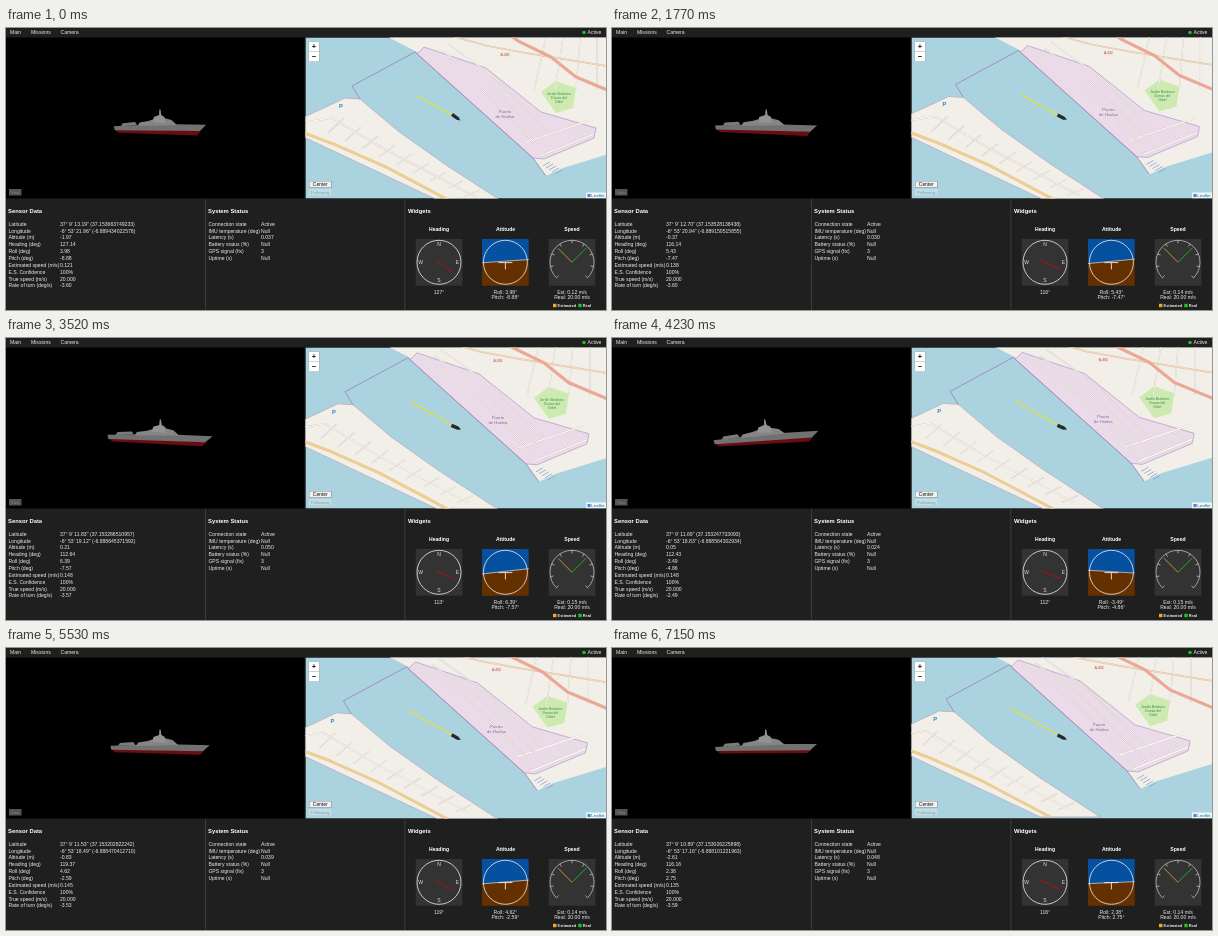
An HTML page with a canvas that plays this animation: 600x282 px, repeating every 7.19 s.

```html
<!DOCTYPE html>
<html lang="en">
<head>
<meta charset="utf-8">
<title>Vessel monitor</title>
<style>
html, body { margin: 0; width: 100%; height: 100%; overflow: hidden; background: #1f1f1f; }
canvas { display: block; width: 600px; height: 282px; }
</style>
</head>
<body>
<canvas id="stage"></canvas>
<script>
const LOOP = 7190, END = 7150, STEP = 47.9;
const { PI, sin, cos, abs, floor, round } = Math;
const canvas = document.getElementById('stage');
const dpr = window.devicePixelRatio || 1;
canvas.width = 600 * dpr;
canvas.height = 282 * dpr;
const c = canvas.getContext('2d');

// Attitude key points; swell adds the rocking between them
const times = [0, 950, 1770, 2850, 4230, 5530, END];
const keys = {
  heading: [127.14, 118.65, 116.14, 112.84, 112.43, 119.37, 116.16],
  roll: [3.98, -7.45, 5.43, -7.28, -3.49, 4.62, 2.38],
  pitch: [-8.88, 5.34, -7.47, 6.40, -4.86, -2.59, 2.75]
};
const swell = {
  heading: () => 0,
  roll: t => 7 * cos(2 * PI * (t + 150) / 1850),
  pitch: t => -6 * cos(2 * PI * t / 1850)
};

function sample(time) {
  let k = times.length - 1;
  while (times[k] > time) k--;
  const n = Math.min(k + 1, times.length - 1);
  const span = times[n] - times[k];
  const steps = round(span / STEP);
  const u = span ? floor((time - times[k]) / span * steps) / steps : 0;
  const t = times[k] + u * span;
  const s = {};
  for (const name in keys) {
    const wave = swell[name];
    const a = keys[name][k] - wave(times[k]);
    const b = keys[name][n] - wave(times[n]);
    s[name] = a + (b - a) * u + wave(t);
  }
  const arch = sin(PI * t / END);
  s.way = t / END + 0.1 * arch * sin(2 * PI * (t - 2200) / 5200);
  s.lat = 37.153663749233 - 0.000637523335 * s.way;
  s.lon = -6.889434022578 + 0.001332800615 * s.way;
  s.alt = -1.97 - 0.64 * t / END + 2.5 * arch;
  s.speed = 0.121 + 0.014 * t / END + 0.02 * arch;
  s.rate = -2.9 - 0.7 * cos(2 * PI * t / 1800);
  s.latency = 0.037 - 0.02 * sin(t / 600) + 0.006 * sin(t * 1.7);
  return s;
}

function text(str, x, y, size = 5.1, color = '#eee', align = 'left', weight = 'normal') {
  c.font = `${weight} ${size}px "Liberation Sans", Arial, sans-serif`;
  c.textAlign = align;
  c.fillStyle = color;
  c.fillText(str, x, y);
}

function trace(p) {
  c.beginPath();
  for (let i = 0; i < p.length; i += 2) c.lineTo(p[i], p[i + 1]);
}

function line(p, color, width = 1) {
  trace(p);
  c.strokeStyle = color;
  c.lineWidth = width;
  c.stroke();
}

function poly(p, fill, stroke) {
  trace(p);
  c.closePath();
  c.fillStyle = fill;
  c.fill();
  if (stroke) { c.strokeStyle = stroke; c.lineWidth = 0.8; c.stroke(); }
}

function rect(x, y, w, h, color) {
  c.fillStyle = color;
  c.fillRect(x, y, w, h);
}

function ring(x, y, r, color, a = 0, b = 2 * PI) {
  c.beginPath();
  c.arc(x, y, r, a, b);
  c.strokeStyle = color;
  c.lineWidth = 0.8;
  c.stroke();
}

function placed(x, y, degrees, draw) {
  c.save();
  c.translate(x, y);
  c.rotate(degrees * PI / 180);
  draw();
  c.restore();
}

function within(x, y, w, h, draw) {
  c.save();
  c.beginPath();
  c.rect(x, y, w, h);
  c.clip();
  draw();
  c.restore();
}

function drawCamera(s) {
  rect(0, 9.5, 298.5, 161, '#000');
  placed(154, 98, s.roll * 0.6 - 2.6, () => {
    c.scale(1 - (s.heading - 114) * 0.0085, 1);
    const keel = 8.3 - s.pitch * 0.15;
    poly([-51, 3, 46, 5, 42, keel, -47, 6.5], '#690d12');
    poly([-52, 0, 0, -2, 52, -1, 45, 5.2, -51, 4], '#717171');
    poly([-44, 0, -42, -3, -28, -4, -26, -1], '#7c7c7c');
    poly([-25, 0, -23, -3.5, -13, -5, 0, -9, 13, -6, 19, -1], '#858585');
    poly([-8, -4, -7, -9, -1, -11, -0.6, -16.5, 0.6, -16.5, 1.5, -11, 5, -9, 6, -3], '#929292');
  });
  rect(3, 161, 12.5, 6.5, '#555');
  text('View', 9.2, 165.7, 3.6, '#888', 'center');
}

function road(p, color, width) {
  line(p, '#c9bdb2', width + 0.5);
  line(p, color, width);
}

function drawSouth() {
  poly([285, 95, 320, 79, 339, 70, 354, 71, 392, 103, 440, 137, 500, 176, 440, 176, 285, 103],
    '#f2efe9', '#b9aebb');
  for (let i = 0; i < 9; i++) {
    const x = 322 + i * 17, y = 105 + i * 8;
    road([x, y, x + 16, y - 15 + i], '#fff', 0.7);
  }
  road([300, 94, 326, 90, 380, 122, 470, 169], '#fff', 1);
  road([285, 100, 330, 117, 380, 139, 450, 176], '#f7cf83', 2.2);
}

function drawNorth() {
  poly([370, -10, 384, 10, 411, 24, 527, 130, 540, 148, 557, 140, 625, 119, 625, -10], '#f2efe9');
  poly([535, 64, 550, 53, 570, 60, 567, 80, 550, 85], '#cdebb0');
  poly([411, 26, 418, 19, 480, 40, 535, 84, 590, 100, 588, 110, 538, 131, 527, 130], '#ebdbe8', '#b7a0cc');
  for (let i = 0; i < 5; i++) {
    const x = 537 + i * 3, y = 138 + i * 2;
    line([x, y, x + 7, y - 4], '#8f9fd2', 0.8);
    road([527 + i * 11, 119 - i * 5, 535 + i * 11, 126 - i * 5], '#fff', 1);
  }
  road([520, 114, 585, 92], '#fff', 1.2);
  road([534, 128, 588, 106], '#fff', 1.2);
  for (let i = 0; i < 3; i++) {
    const x = 428 + i * 7, y = 28 - i * 6;
    road([x, y, x + 45, y + 32, x + 102, y + 88], '#fff', 0.9);
  }
  for (let i = 0; i < 4; i++) road([540 + i * 17, 10, 528 + i * 21, 62], '#fff', 0.8);
  road([418, -8, 449, 9, 482, 18, 520, 25, 625, 42], '#f9d9b5', 1.2);
  road([485, -8, 512, 13, 545, 29, 570, 49, 625, 72], '#f2a590', 2.6);
}

function drawMap(s) {
  rect(299.5, 9.5, 301, 161, '#aad3df');
  const dx = -11.9 * s.way, dy = -7.1 * s.way;
  c.save();
  c.translate(dx, dy);
  drawSouth();
  drawNorth();
  line([354, 71, 346, 58, 409, 24, 527, 130, 540, 148], '#9d8ab5', 0.9);
  text('Puerto', 499, 85, 4.2, '#7d68a8', 'center');
  text('de Huelva', 499, 90, 4.2, '#7d68a8', 'center');
  ['Jardín Botánico', 'Dunas del', 'Odiel'].forEach((row, i) =>
    text(row, 553, 67 + i * 4, 3.5, '#3f8650', 'center'));
  rect(494, 24.5, 10, 4.5, '#f7e5dc');
  text('A-492', 499, 28, 3.3, '#9c5546', 'center');
  text('P', 335, 80, 5.8, '#2286ce', 'center', 'bold');
  c.restore();
  c.setLineDash([3, 0.7]);
  line([411.5 + dx, 68 + dy, 446, 87], '#e7e51c', 1.3);
  c.setLineDash([]);
  placed(450, 89.3, s.heading - 90, () =>
    poly([-5, -1.7, 2, -1.7, 5.5, 0, 2, 1.7, -5, 1.7], '#252a2b'));
  drawMapControls();
}

function drawMapControls() {
  rect(302.6, 13.6, 10.9, 20, '#aaa');
  ['+', '−'].forEach((sign, i) => {
    rect(303, 14 + i * 9.9, 10, 9.4, '#fff');
    text(sign, 308, 21.2 + i * 9.8, 7.5, '#111', 'center', 'bold');
  });
  rect(303, 153, 22.5, 6.7, '#777');
  rect(303.4, 153.4, 21.7, 5.9, '#f1f1f1');
  text('Center', 314.2, 158.1, 4.9, '#111', 'center');
  rect(303, 161, 22.5, 6.2, 'rgba(255,255,255,.25)');
  text('Following', 314.2, 165.8, 4.4, '#8e989c', 'center');
  rect(580, 164.5, 20, 6, 'rgba(255,255,255,.8)');
  rect(581.5, 166, 3, 3, '#4c7be1');
  text('Leaflet', 585.3, 169.2, 4.4, '#0078a8');
}

function dms(v) {
  const a = abs(v), d = floor(a), m = floor((a - d) * 60);
  const sec = ((a - d) * 60 - m) * 60;
  return `${v < 0 ? '-' : ''}${d}° ${m}' ${sec.toFixed(2)}" (${v.toFixed(12)})`;
}

function table(title, x, valueX, rows) {
  text(title, x, 184.8, 5.85, '#fff', 'left', 'bold');
  Object.entries(rows).forEach(([label, value], i) => {
    const y = 197.7 + i * 6.85;
    text(label, x + 0.4, y);
    text(value, valueX, y);
  });
}

function drawHeading(s) {
  const x = 433, y = 234.3;
  rect(x - 23.3, 211, 46.7, 46.7, '#333');
  ring(x, y, 22, '#eee');
  ['N', 'E', 'S', 'W'].forEach((name, i) => {
    const a = i * PI / 2;
    text(name, x + 18.5 * sin(a), y + 1.8 - 18.2 * cos(a), 5, '#ddd', 'center');
  });
  placed(x, y, s.heading, () => line([0, 4, 0, -17], '#a81414', 1));
  text(round(s.heading) + '°', x, 265.8, 5.1, '#eee', 'center');
}

function drawAttitude(s) {
  const x = 499.4, y = 234.3;
  within(x - 23.4, 211, 46.7, 46.7, () =>
    placed(x, y + s.pitch * 0.13, -s.roll, () => {
      rect(-50, -60, 100, 60, '#0650a0');
      rect(-50, 0, 100, 60, '#653000');
      line([-50, 0, 50, 0], '#ddd', 0.7);
    }));
  ring(x, y, 22, '#eee');
  line([x - 7, y + 0.3, x + 7, y + 0.3], '#fff', 0.8);
  line([x, y + 0.3, x, y + 7.2], '#fff', 0.8);
  text(`Roll: ${s.roll.toFixed(2)}°`, x, 265.8, 5.1, '#eee', 'center');
  text(`Pitch: ${s.pitch.toFixed(2)}°`, x, 271.2, 5.1, '#eee', 'center');
}

function drawSpeed(s) {
  const x = 566, y = 234.3;
  rect(x - 23.3, 211, 46.7, 46.7, '#333');
  ring(x, y, 22, '#bbb', PI * 0.75, PI * 2.25);
  for (let i = 0; i <= 8; i++) {
    const a = PI * (0.75 + i * 0.1875), u = cos(a), v = sin(a);
    line([x + u * 19, y + v * 19, x + u * 22, y + v * 22], '#ddd', 0.7);
  }
  line([x, y, x - 14, y - 14], '#d99a28', 0.9);
  line([x, y, x + 14.5, y - 14.5], '#16b925', 0.9);
  text(`Est: ${s.speed.toFixed(2)} m/s`, x, 265.8, 5.1, '#eee', 'center');
  text('Real: 20.00 m/s', x, 271.2, 5.1, '#eee', 'center');
  rect(547, 275.8, 3.4, 3.4, '#f5a623');
  text('Estimated', 551.6, 279, 3.9, '#eee', 'left', 'bold');
  rect(572.3, 275.8, 3.4, 3.4, '#16c925');
  text('Real', 576.8, 279, 3.9, '#eee', 'left', 'bold');
}

function drawPanels(s) {
  table('Sensor Data', 2, 54, {
    'Latitude': dms(s.lat),
    'Longitude': dms(s.lon),
    'Altitude (m)': s.alt.toFixed(2),
    'Heading (deg)': s.heading.toFixed(2),
    'Roll (deg)': s.roll.toFixed(2),
    'Pitch (deg)': s.pitch.toFixed(2),
    'Estimated speed (m/s)': s.speed.toFixed(3),
    'E.S. Confidence': '100%',
    'True speed (m/s)': '20.000',
    'Rate of turn (deg/s)': s.rate.toFixed(2)
  });
  table('System Status', 202, 255, {
    'Connection state': 'Active',
    'IMU temperature (deg)': 'Null',
    'Latency (s)': s.latency.toFixed(3),
    'Battery status (%)': 'Null',
    'GPS signal (fix)': '3',
    'Uptime (s)': 'Null'
  });
  table('Widgets', 402, 402, {});
  rect(199, 171, 0.8, 111, '#444');
  rect(398.5, 171, 0.8, 111, '#444');
  ['Heading', 'Attitude', 'Speed'].forEach((name, i) =>
    text(name, 433 + i * 66.5, 203.3, 5.1, '#fff', 'center', 'bold'));
  drawHeading(s);
  drawAttitude(s);
  drawSpeed(s);
}

function drawBar() {
  text('Main', 4, 6.4);
  text('Missions', 25, 6.4);
  text('Camera', 54.5, 6.4);
  c.beginPath();
  c.arc(578, 4.5, 1.8, 0, 2 * PI);
  c.fillStyle = '#18c418';
  c.fill();
  text('Active', 581.5, 6.4);
}

const start = performance.now();
function frame() {
  const s = sample((performance.now() - start) % LOOP);
  c.setTransform(dpr, 0, 0, dpr, 0, 0);
  rect(0, 0, 600, 282, '#1f1f1f');
  drawBar();
  drawCamera(s);
  within(299.5, 9.5, 301, 161, () => drawMap(s));
  drawPanels(s);
  requestAnimationFrame(frame);
}
frame();
</script>
</body>
</html>
```
